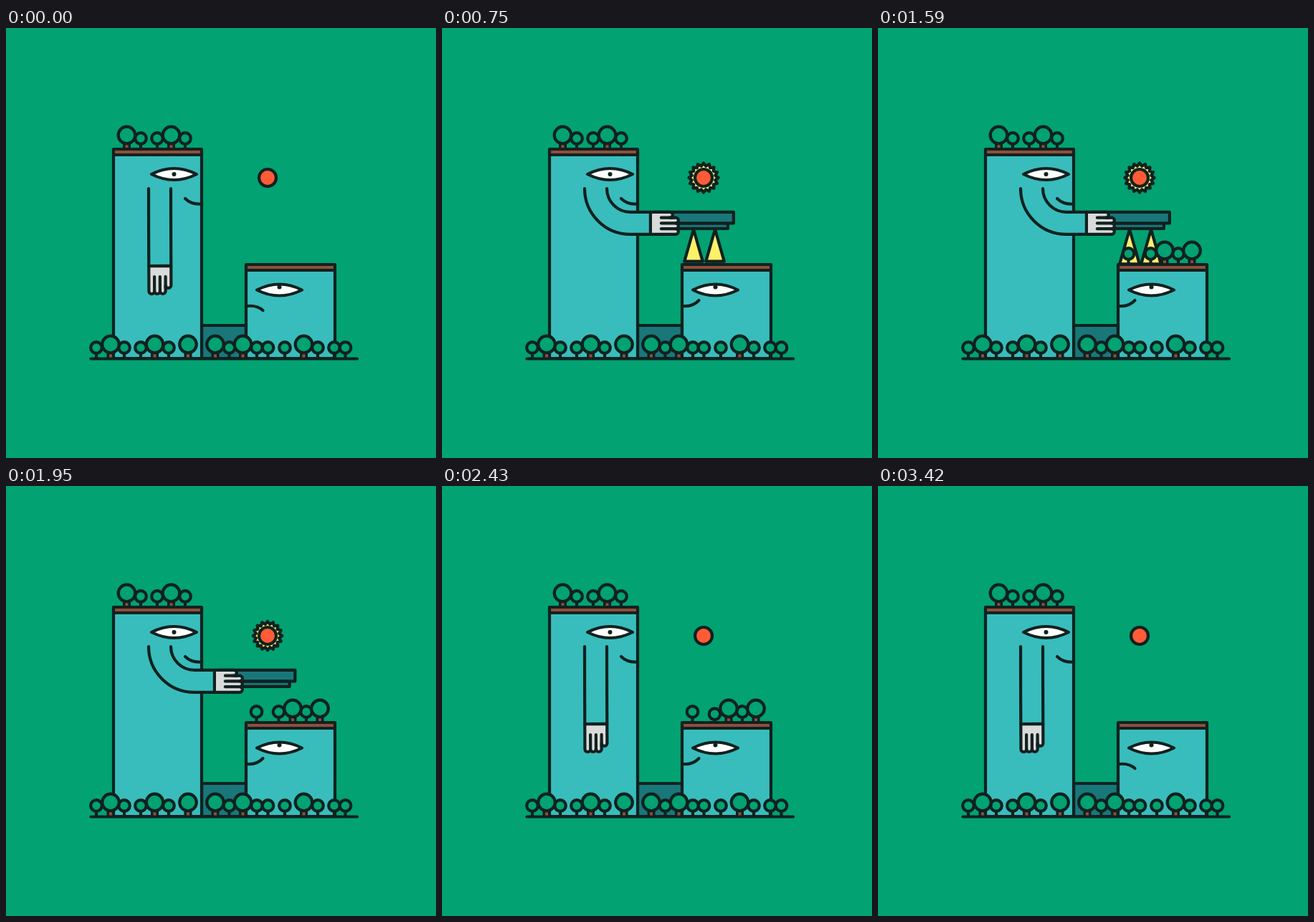
Write an HTML page with a canvas that moves like this. It is 600x600 px and loops after 3.63 s.

```html
<!DOCTYPE html>
<html lang="en">
<head>
<meta charset="utf-8">
<title>Sharing the sun</title>
<style>
  html, body { margin: 0; width: 100%; height: 100%; overflow: hidden; background: #02a272; }
  canvas { display: block; width: 600px; height: 600px; }
</style>
</head>
<body>
<canvas id="stage" width="600" height="600"></canvas>
<script>
const ctx = document.getElementById('stage').getContext('2d');
const LOOP = 3630, STEP = 30, PI = Math.PI;
const GREEN = '#02a272', TEAL = '#38bdbc', DEEP = '#19777a', INK = '#11211f',
      BROWN = '#8f4f3d', RED = '#ff5c36', YELLOW = '#fff06a', GREY = '#d9dada';

// Easing
const clamp = x => Math.min(1, Math.max(0, x));
const inOut = x => x < 0.5 ? 4 * x ** 3 : 1 - 4 * (1 - x) ** 3;
const out = x => 1 - (1 - x) ** 3;
const backIn = x => 1.9 * x ** 3 - 0.9 * x * x;
const backOut = x => 1 - backIn(1 - x);
const span = (t, start, length, ease) => ease(clamp((t - start) / length));
// Goes 0 to 1 at the first span and back to 0 at the second
const pulse = (t, [a, da, easeA], [b, db, easeB]) =>
  span(t, a, da, easeA) - span(t, b, db, easeB);

// Drawing helpers
function paint(fill, stroke = true) {
  if (fill) { ctx.fillStyle = fill; ctx.fill(); }
  if (stroke) ctx.stroke();
}
function disc(x, y, r, fill, stroke) {
  ctx.beginPath();
  ctx.arc(x, y, r, 0, 2 * PI);
  paint(fill, stroke);
}
function box(x, y, w, h, fill) {
  ctx.beginPath();
  ctx.rect(x, y, w, h);
  paint(fill);
}
function line(...p) {
  ctx.beginPath();
  for (let i = 0; i < p.length; i += 2) ctx.lineTo(p[i], p[i + 1]);
  ctx.stroke();
}
function curve(x, y, cx, cy, ex, ey) {
  ctx.beginPath();
  ctx.moveTo(x, y);
  ctx.quadraticCurveTo(cx, cy, ex, ey);
  ctx.stroke();
}

// A tree stands on base; big ones have a two-line trunk
function tree(x, base, big) {
  if (big) {
    ctx.fillStyle = INK;
    ctx.fillRect(x - 5.5, base - 9, 11, 9);
    ctx.fillStyle = BROWN;
    ctx.fillRect(x - 2, base - 9, 4, 9);
    disc(x, base - 19.5, 11.8, GREEN);
  } else {
    line(x, base - 7, x, base);
    disc(x, base - 15, 7.8, GREEN);
  }
}
function row(small, big, base) {
  small.forEach(x => tree(x, base, false));
  big.forEach(x => tree(x, base, true));
}

function building(x, y, w) {
  box(x, y + 8, w, 461 - y - 8, TEAL);
  box(x, y, w, 8, BROWN);
}
function eye(x, y, pupilY) {
  ctx.beginPath();
  ctx.moveTo(x - 31.5, y);
  ctx.quadraticCurveTo(x, y - 16, x + 31.5, y);
  ctx.quadraticCurveTo(x, y + 16, x - 31.5, y);
  ctx.closePath();
  paint('#fff');
  disc(x, pupilY, 3, INK, false);
}

function sun(p) {
  if (p > 0.02) {
    const teeth = 16, tip = 12 + 8.6 * p, dip = 11.5 + 5 * p;
    ctx.beginPath();
    for (let i = 0; i < teeth * 2; i++) {
      const a = i * PI / teeth - PI / 2, r = i % 2 ? dip : tip;
      ctx.lineTo(365 + r * Math.cos(a), 209 + r * Math.sin(a));
    }
    ctx.closePath();
    paint(YELLOW);
  }
  disc(365, 209, 12, RED);
}

function beams(p) {
  if (p < 0.01) return;
  for (const x of [351, 381]) {
    ctx.beginPath();
    ctx.moveTo(x, 281);
    ctx.lineTo(x + 14 * p, 281 + 49 * p);
    ctx.lineTo(x - 14 * p, 281 + 49 * p);
    ctx.closePath();
    paint(YELLOW);
  }
}

function hand() {
  const r = 3.875;
  ctx.beginPath();
  ctx.moveTo(0, -4 * r);
  [31, 39, 39, 39].forEach((len, i) =>
    ctx.arc(len - r, (2 * i - 3) * r, r, -PI / 2, PI / 2));
  ctx.lineTo(0, 4 * r);
  ctx.closePath();
  paint(GREY);
  for (let i = -1; i < 2; i++) line(15, 2 * i * r, i < 0 ? 31 : 36, 2 * i * r);
}

// The arm is a bent ribbon: an arc of fixed length, then a straight forearm
function arm(lift, panel) {
  const half = 15.5, bend = Math.max(0.004, lift * PI / 2), R = 76 / bend;
  const fore = 32 - 4 * lift - 46 * lift * (1 - lift);
  const ox = 214.5 + R, oy = 224, end = PI - bend, dir = PI / 2 - bend;
  const cx = ox + R * Math.cos(end) + fore * Math.cos(dir);
  const cy = oy + R * Math.sin(end) + fore * Math.sin(dir);
  const nx = -Math.sin(dir) * half, ny = Math.cos(dir) * half;
  const inHandFrame = draw => {
    ctx.save();
    ctx.translate(cx, cy);
    ctx.rotate(dir);
    draw();
    ctx.restore();
  };

  if (panel > 0.01) inHandFrame(() => {
    box(6, 0, 14 + 88 * panel, 7.5, DEEP);
    box(6, -15.5, 14 + 96 * panel, 15.5, DEEP);
  });

  ctx.beginPath();
  ctx.arc(ox, oy, R + half, PI, end, true);
  ctx.lineTo(cx + nx, cy + ny);
  ctx.lineTo(cx - nx, cy - ny);
  ctx.arc(ox, oy, R - half, end, PI, false);
  paint(TEAL, false);
  for (const s of [1, -1]) {
    ctx.beginPath();
    ctx.arc(ox, oy, R + s * half, PI, end, true);
    ctx.lineTo(cx + s * nx, cy + s * ny);
    ctx.stroke();
  }
  inHandFrame(hand);
}

// x, big, grow start, sink start, sink length
const garden = [
  [349.5, 0, 940, 2590, 720],
  [380.5, 0, 740, 2400, 640],
  [419, 0, 990, 2645, 740],
  [400, 1, 840, 2480, 800],
  [438, 1, 780, 2430, 840]
];

function draw(t) {
  const lift = pulse(t, [15, 345, inOut], [2070, 210, inOut]);
  const open = pulse(t, [160, 280, backOut], [1774, 326, backIn]);
  const light = pulse(t, [520, 320, inOut], [1550, 280, inOut]);
  const smile = pulse(t, [420, 240, inOut], [2760, 260, inOut]);

  ctx.fillStyle = GREEN;
  ctx.fillRect(0, 0, 600, 600);
  ctx.strokeStyle = INK;
  ctx.lineWidth = 4.2;
  ctx.lineCap = ctx.lineJoin = 'round';

  sun(open);
  beams(light);
  for (const [x, big, grow, sink, len] of garden) {
    const up = pulse(t, [grow, 460, out], [sink, len, out]);
    if (up > 0.001) tree(x, 330 + (big ? 34 : 24) * (1 - up), big);
  }

  box(273, 415, 62, 46, DEEP);
  building(335, 330, 124);
  eye(381.5, 365.5, 361.5);
  curve(337, 388, 350, 386.5 + 2.5 * smile, 358.5, 394 - 14 * smile);

  row([188, 211, 250], [168.5, 230.5], 169);
  building(150, 169, 123);
  eye(234.5, 204, 204);
  curve(250, 238, 258, 246, 271, 245.5);

  row([126, 165, 188, 227, 311.5, 350, 365.5, 389, 435, 458, 473.5],
      [146, 207.5, 254, 292, 330.5, 415.5], 461);
  line(118.5, 461.5, 490, 461.5);
  arm(lift, open);
}

function tick() {
  const t = performance.now() % LOOP;
  draw(Math.floor(t / STEP) * STEP);
  requestAnimationFrame(tick);
}
tick();
</script>
</body>
</html>
```
